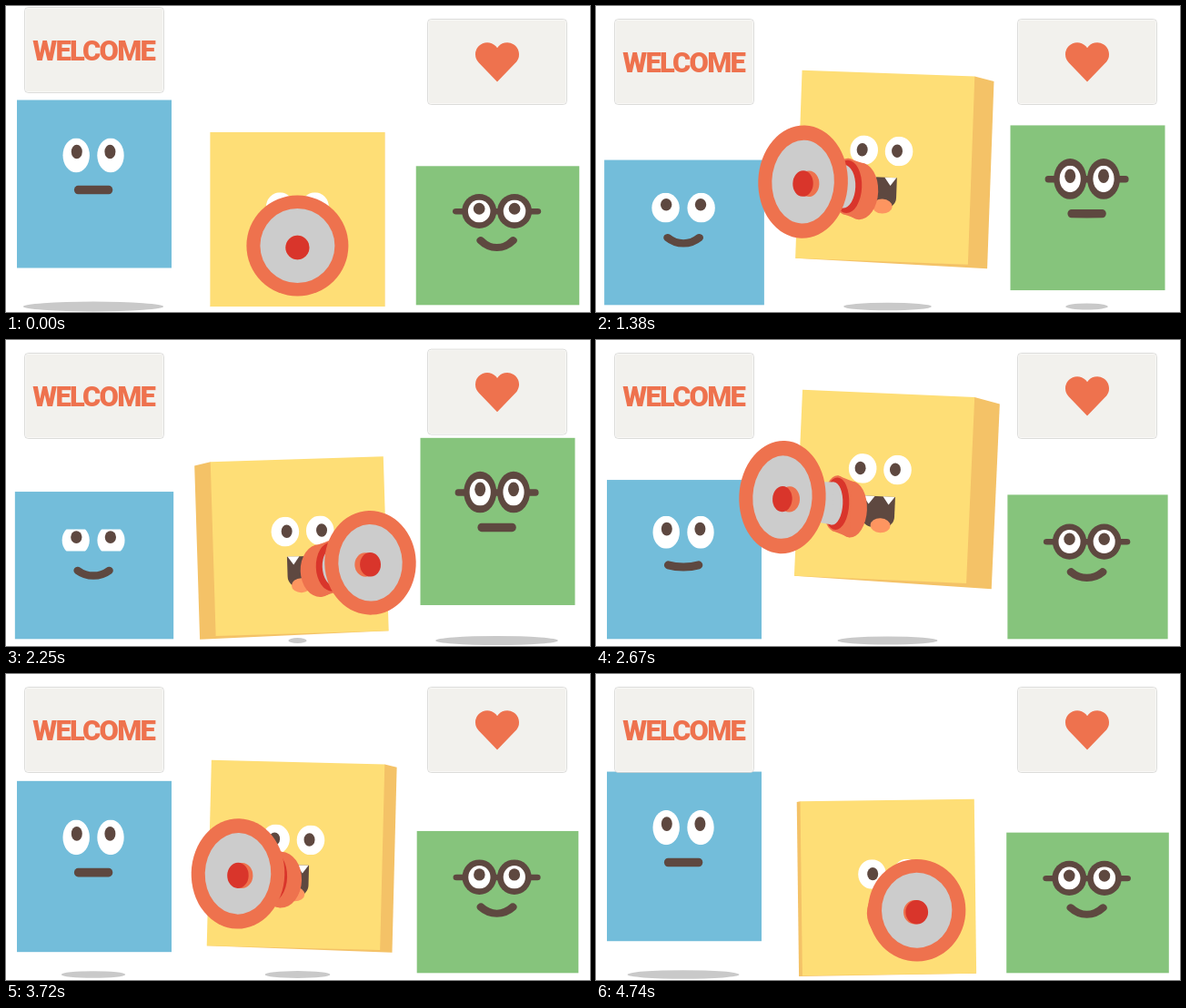
Animation, 642 px wide and 337 px high, one loop 4770 ms. Source, as an HTML page with a canvas:

```html
<!DOCTYPE html>
<html lang="en">
<head>
<meta charset="utf-8">
<title>Welcome</title>
<style>
html, body { margin: 0; width: 100%; height: 100%; overflow: hidden; background: #fff; }
canvas { display: block; }
</style>
</head>
<body>
<canvas id="stage" width="642" height="337"></canvas>
<script>
const ctx = document.getElementById('stage').getContext('2d');
const LOOP = 4770, STEP = 30, BOUNCE = 960, JUMP = 600;
const C = {
  blue: '#73bdda', green: '#86c47c', yellow: '#fede76', side: '#f4c267',
  orange: '#ee724e', tongue: '#fd9560', red: '#d9352b', grey: '#cccccc',
  brown: '#5e4840', sign: '#f2f1ed', shadow: '#c9c9c9', white: '#ffffff'
};

const clamp = (v, lo = 0, hi = 1) => Math.min(hi, Math.max(lo, v));
const ease = v => { const s = clamp(v); return s * s * (3 - 2 * s); };

function ellipse(x, y, rx, ry, color) {
  ctx.fillStyle = color;
  ctx.beginPath();
  ctx.ellipse(x, y, rx, ry, 0, 0, 2 * Math.PI);
  ctx.fill();
}

function poly(color, ...points) {
  ctx.fillStyle = color;
  ctx.beginPath();
  points.forEach(p => ctx.lineTo(...p));
  ctx.closePath();
  ctx.fill();
}

function shadow(x, width) {
  if (width > 3) ellipse(x, 331, width / 2, 2.6 + width * .018, C.shadow);
}

function eye(x, y, rx, ry, open, pupilX, pupilY) {
  ctx.save();
  ctx.beginPath();
  ctx.rect(x - rx - 1, y - ry * open, 2 * rx + 2, 2 * ry * open);
  ctx.clip();
  ellipse(x, y, rx, ry, C.white);
  ellipse(x + pupilX, y + pupilY, 6, 7.2, C.brown);
  ctx.restore();
}

// Phase of a bouncing cube: -300 is the deepest squash, 0 the top of the hop.
const cubePhase = (t, delay) => (t - delay + 300 + BOUNCE) % BOUNCE - 300;

function cubePose(u) {
  const reach = Math.abs(u + 5) / (u < -5 ? 200 : 175);
  const lift = Math.max(0, 41 * (1 - reach ** 1.5));
  const sinking = .028 * (660 - u) * ease((u + 300) / 110);
  const height = 153 + sinking + 13.5 * Math.min(1, lift / 12);
  return {
    lift, height,
    half: 85 + Math.max(0, 170 - height) * .28,
    smile: Math.max(0, 182 - height) * .3,
    open: clamp(Math.abs(u - 250) / 110, .06),
    push: 13 * Math.max(0, 1 - Math.abs(u) / 45)
  };
}

function drawCube(x, pose, color, glasses) {
  const { lift, height, half, smile, open } = pose;
  const top = 329.3 - lift - height;
  shadow(x - 1, lift * (2.7 + .00065 * lift * lift));

  ctx.fillStyle = color;
  ctx.fillRect(x - half, top, 2 * half, height);

  ctx.save();
  ctx.translate(x - .9, top);
  ctx.scale(half / 85, height / 170);
  ctx.strokeStyle = C.brown;
  ctx.lineCap = 'round';
  if (glasses) {
    ctx.lineWidth = 7;
    ctx.beginPath();
    ctx.moveTo(-42.5, 55.5);
    ctx.lineTo(42.5, 55.5);
    ctx.stroke();
  }
  for (const side of [-1, 1]) {
    if (glasses) {
      ellipse(side * 18.4, 55.2, 18, 21, C.brown);
      eye(side * 18.4, 55.2, 11.6, 13.8, open, 0, -3);
    } else {
      eye(side * 18.9, 56, 14.7, 17.4, open, side * -.6, -3.6);
    }
  }
  ctx.lineWidth = 8.8;
  ctx.beginPath();
  ctx.moveTo(-16.8, 91);
  ctx.bezierCurveTo(-7, 91 + 1.33 * smile, 7, 91 + 1.33 * smile, 16.8, 91);
  ctx.stroke();
  ctx.restore();
}

function drawMouth() {
  ctx.fillStyle = C.brown;
  ctx.beginPath();
  ctx.roundRect(-18, 11, 36, 34, [0, 0, 12, 12]);
  ctx.fill();
  ellipse(-3, 43, 11, 8, C.tongue);
  for (const x of [-11, 11]) poly(C.white, [x - 6.5, 11], [x + 6.5, 11], [x, 20]);
}

// The horn's parts fan out along x as the body turns.
function drawHorn(x, stretch) {
  const baseX = .42 * x - 11, baseY = 29 - .02 * x, baseR = 29 * stretch;
  const collarX = .5 * x - 4, collarY = 29 - .07 * x;
  const ringY = 29 - .11 * x;
  const neckX = collarX + 4, neckR = 22 * stretch;

  ellipse(baseX, baseY, 29 - .1 * x, baseR, C.orange);
  poly(C.orange, [baseX, baseY - baseR], [collarX, collarY - baseR],
    [collarX, collarY + baseR], [baseX, baseY + baseR]);
  ellipse(collarX, collarY, 27 - .11 * x, baseR, C.orange);
  ellipse(collarX, collarY, 25 - .1 * x, 27 * stretch, C.red);
  ellipse(neckX, collarY, 22 - .1 * x, neckR, C.grey);
  poly(C.grey, [neckX, collarY - neckR], [x, ringY - 18], [x, ringY + 20], [neckX, collarY + neckR]);

  const flare = stretch * (1 + .0004 * x);
  ellipse(x, ringY, 56 - .075 * x, 55.6 * flare, C.orange);
  ellipse(x, ringY, 41 - .075 * x, 41 * flare, C.grey);
  const knobY = ringY + 2, knobR = 13.2 * stretch;
  ellipse(x - .07 * x, knobY, 13 - .015 * x, knobR, C.orange);
  ellipse(x, knobY, 13 - .02 * x, knobR, C.red);
}

function drawJumper(t) {
  const u = t % JUMP, apex = 250;
  const facing = Math.floor(t / JUMP) % 2 ? 1 : -1;
  const x = 113 * Math.sin(Math.PI * u / JUMP) ** 1.1;
  const rise = u / apex;
  const lift = 75 * (u < apex ? (rise + ease(rise)) / 2 : ease(2 - rise));
  const height = 192 + 15.5 * Math.sin(Math.PI * Math.min(1, u / 400));
  const stretch = height / 192;
  const w = 96 - .012 * x, h = height / 2;
  const depth = Math.max(0, .3 * x - 5.5);

  shadow(320.5, 145 * (1 - Math.exp(-lift / 52)));
  ctx.save();
  ctx.translate(320.4, 235 - lift);
  ctx.scale(facing, 1);
  ctx.translate(.03 * x, 0);
  ctx.rotate(-.0004 * x);

  poly(C.side, [-w - depth, -h + depth * .22], [-w, -h], [w, h], [-w - depth, h + depth * .18]);
  ctx.fillStyle = C.yellow;
  ctx.fillRect(-w, -h, 2 * w, height);

  ctx.save();
  ctx.translate(.05 * x, 0);
  for (const side of [-1, 1]) {
    eye(side * 19.2, -13.5 * stretch - .04 * x, 15.3, 16.3, 1, .023 * x, -.3);
  }
  if (x > 20) drawMouth();
  ctx.restore();
  drawHorn(x, stretch);
  ctx.restore();
}

function drawBoard(x, lift, drawContent) {
  ctx.save();
  ctx.translate(x, 14 - lift);
  ctx.beginPath();
  ctx.roundRect(.5, .5, 153, 94, 4);
  ctx.fillStyle = C.white;
  ctx.fill();
  ctx.strokeStyle = '#c4c4c2';
  ctx.lineWidth = .6;
  ctx.stroke();
  ctx.fillStyle = C.sign;
  ctx.beginPath();
  ctx.roundRect(1.5, 1.5, 151, 92, 3);
  ctx.fill();
  ctx.fillStyle = C.orange;
  drawContent();
  ctx.restore();
}

function drawWord() {
  ctx.font = '900 condensed 31px Roboto, "Liberation Sans", sans-serif';
  ctx.letterSpacing = '-1.8px';
  ctx.textAlign = 'center';
  ctx.fillText('WELCOME', 76.2, 58.5);
}

function drawHeart() {
  const r = 13, gap = 11, notch = Math.acos(gap / r);
  ctx.beginPath();
  ctx.moveTo(77, 69.5);
  ctx.arc(77 - gap, 39.3, r, Math.PI * .75, -notch);
  ctx.arc(77 + gap, 39.3, r, Math.PI + notch, Math.PI * .25);
  ctx.closePath();
  ctx.fill();
}

function draw(t) {
  ctx.fillStyle = C.white;
  ctx.fillRect(0, 0, 642, 337);
  const left = cubePose(cubePhase(t, 0)), right = cubePose(cubePhase(t, 300));
  drawCube(97, left, C.blue, false);
  drawCube(540.5, right, C.green, true);
  drawBoard(20, left.push, drawWord);
  drawBoard(463, right.push, drawHeart);
  drawJumper(t);
}

const start = performance.now();
function tick() {
  const t = Math.max(0, performance.now() - start) % LOOP;
  draw(Math.floor(t / STEP) * STEP);
  requestAnimationFrame(tick);
}
tick();
</script>
</body>
</html>
```
